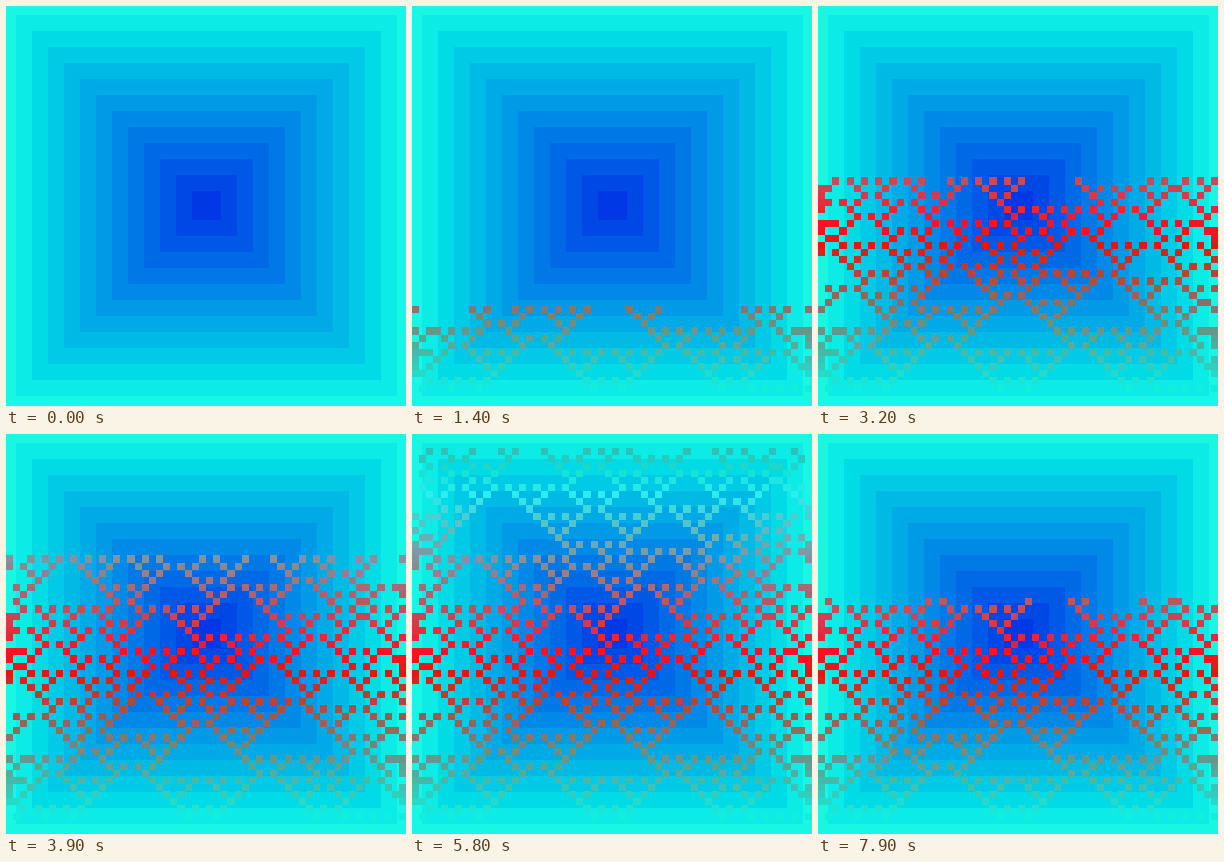
Animation of 400 by 400 pixels, one loop 8000 ms. Source, as an HTML page with a canvas:

```html
<!DOCTYPE html>
<html lang="en">
<head>
<meta charset="utf-8">
<title>Cellular weave</title>
<style>
  html, body { margin: 0; width: 100%; height: 100%; overflow: hidden; background: #19f6e4; }
  canvas { display: block; width: 400px; height: 400px; }
</style>
</head>
<body>
<canvas id="stage" width="400" height="400"></canvas>
<script>
const SIZE = 400, CELLS = 56, FIRST_ROW = 53;
const STEP = 100, GROW_AT = 300, ERASE_AT = 5700, LOOP = 8000;
const ctx = document.getElementById('stage').getContext('2d');

// Everything grows from one bottom row; the outermost columns feed in pulses (runs of rows).
const seed = [1, 5, 9, 25, 29, 43, 47, 49, 51, 53];
const leftPulses = [[11], [13], [15, 18], [25, 28], [30, 31], [33, 34], [42], [45], [47, 51]];
const rightPulses = [[10, 11], [15, 17], [21, 22], [24], [28], [31, 33], [35], [37], [39], [42], [45, 47], [49, 51], [53]];

// Key colours of the row gradient: row, then red, green, blue.
const keys = [
  [0, 60, 172, 155], [5, 22, 226, 214], [8, 45, 236, 240],
  [30, 255, 16, 36], [33, 226, 24, 16], [53, 18, 238, 220]
];

const pulsing = (pulses, row) => pulses.some(([from, to = from]) => row >= from && row <= to);
const edge = i => Math.round(i * SIZE / CELLS);

function rowColor(row) {
  const i = Math.max(1, keys.findIndex(key => key[0] >= row));
  const [a, b] = [keys[i - 1], keys[i]];
  const k = (row - a[0]) / (b[0] - a[0]);
  return `rgb(${[1, 2, 3].map(c => Math.round(a[c] + (b[c] - a[c]) * k))})`;
}

// Rule 18: an empty cell lights up when exactly one neighbour is lit.
function grow(below) {
  return below.map((on, i) => !on && below[i - 1] !== below[i + 1]);
}

function buildRows() {
  const rows = [];
  let cells = Array.from({ length: CELLS }, (_, i) => seed.includes(i));
  for (let r = FIRST_ROW; r >= 0; r--) {
    cells[0] = pulsing(leftPulses, r);
    cells[CELLS - 1] = pulsing(rightPulses, r);
    rows[r] = cells;
    cells = grow(cells);
  }
  return rows;
}

const rows = buildRows();

function drawSquares() {
  ctx.fillStyle = '#19f6e4';
  ctx.fillRect(0, 0, SIZE, SIZE);
  for (let i = 0; i < 12; i++) {
    ctx.fillStyle = `rgb(${i ? 0 : 13},${Math.round(235 - 16.3 * i)},230)`;
    ctx.fillRect(10 + 16 * i, 9 + 16 * i, 381 - 32 * i, 381 - 32 * i);
  }
}

function drawRow(r) {
  ctx.fillStyle = rowColor(r);
  const y = edge(r), h = edge(r + 1) - y;
  rows[r].forEach((on, i) => {
    if (on) ctx.fillRect(edge(i), y, edge(i + 1) - edge(i), h);
  });
}

function render(now) {
  const t = now % LOOP;
  drawSquares();
  for (let r = 0; r <= FIRST_ROW; r++) {
    const born = GROW_AT + STEP * (FIRST_ROW - r);
    const gone = ERASE_AT + STEP * r;
    if (t >= born && t < gone) drawRow(r);
  }
}

const start = performance.now();
function tick() {
  render(performance.now() - start);
  requestAnimationFrame(tick);
}
tick();
</script>
</body>
</html>
```
